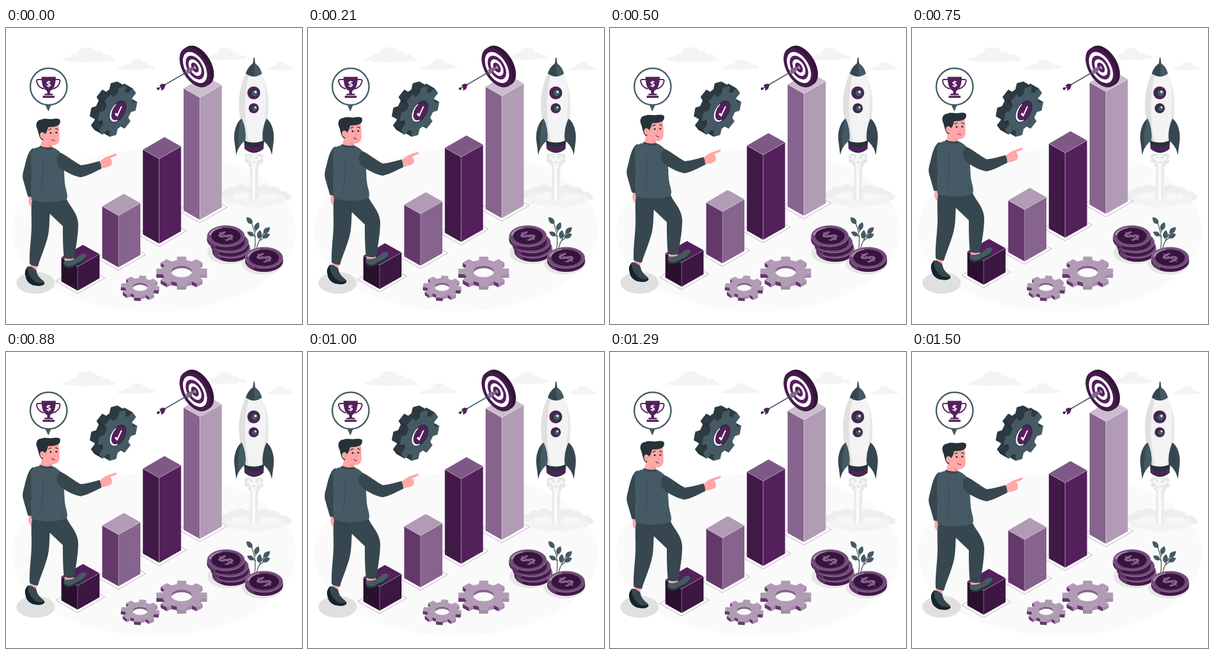
Write an HTML page that moves like this. It is 500 by 500 pixels and loops after 1.54 s.

```html
<!DOCTYPE html>
<html lang="en">
<head>
<meta charset="utf-8">
<title>Growth steps</title>
<style>
html, body { margin: 0; width: 100%; height: 100%; overflow: hidden; background: #fff; }
svg { display: block; width: 100vw; height: 100vh; }
text { font-family: "Open Sans", Arial, sans-serif; font-weight: 700; text-anchor: middle; }
</style>
</head>
<body>
<svg viewBox="0 0 500 500">
  <ellipse cx="250" cy="342" rx="239.500" ry="137.500" fill="#fafafa"/>

  <g fill="#f4f4f4">
    <path d="M95 55C97 50 103 49 108 49C110 44 115 42 120 44C121 35 128 32 135 33C143 31 150 35 153 41C158 38 164 41 165 46C171 43 176 46 177 49C181 50 184 52 185 55C179 58 173 54 166 56C157 59 151 56 143 56C134 60 128 56 119 57C111 58 103 55 95 55Z"/>
    <path d="M188 69C190 66 195 65 199 65C201 61 205 60 209 62C211 55 216 52 222 53C228 52 231 56 232 59C236 57 240 59 241 63C246 62 251 64 252 68C246 70 242 68 237 69C231 71 226 69 220 70C212 72 206 69 200 70C196 71 192 70 188 69Z"/>
    <path d="M335 52C337 48 342 47 346 47C348 43 353 42 356 44C358 36 364 33 370 34C378 33 382 37 383 42C388 39 393 42 394 46C400 45 405 47 407 51C400 54 395 51 389 53C382 55 377 52 370 53C362 55 352 52 347 54Z"/>
    <path d="M440 70C442 67 446 66 449 66C451 63 453 63 455 64C456 59 460 57 465 58C470 57 472 60 473 63C476 62 479 63 480 66C483 66 486 68 487 70C481 72 477 70 472 71C466 73 461 70 455 71C449 73 445 70 440 70Z"/>
  </g>

  <ellipse cx="50" cy="430.500" rx="32.500" ry="18.500" fill="#e0e0e0"/>
  <g id="smoke"></g>

  <!-- rocket -->
  <g>
    <path d="M412 212H427L425 288Q419 293 412 288Z" fill="#ebebeb"/>
    <path d="M416 214H421V290H416Z" fill="#fafafa"/>
    <g id="puffs"></g>
    <path d="M402 188H436L435 204Q419 218 403 204Z" fill="#263238"/>
    <path d="M403 195Q419 208 435 195V202Q419 215 403 202Z" fill="#54205c"/>
    <path d="M405 77C396 95 392 118 394 140C396 160 399 177 402 189Q419 198 436 189C440 172 444 150 444 128C444 109 440 92 432 77Z" fill="#f3f3f3"/>
    <path d="M405 77C396 95 392 118 394 140C396 160 399 177 402 189Q406 192 411 193C403 165 400 115 410 80Z" fill="#e0e0e0"/>
    <path d="M437 92C446 118 443 158 436 189L430 192C438 160 442 120 437 92Z" fill="#e6e6e6"/>
    <path id="fin" d="M398 153C388 160 384 178 386 192L389 215C391 204 396 196 404 190C406 178 403 163 398 153Z" fill="#37474f"/>
    <path d="M398 153C393 166 391 186 393 203C396 197 400 193 404 190C406 178 403 163 398 153Z" fill="#455a64"/>
    <use href="#fin" transform="matrix(-1 0 0 1 838 0)"/>
    <path d="M418.300 50H419.700L421 60C427 64 431 71 432 77Q419 87 405 77C407 70 411 64 417 60Z" fill="#37474f"/>
    <path d="M419 59C426 63 431 71 432 77Q427 81 420 81Z" fill="#455a64"/>
    <g id="ports"></g>
  </g>

  <g id="lift">
    <g id="bars"></g>
    <!-- person -->
    <g>
      <path d="M39 283L38 291C38 297 41 300 44 303L48 286Z" fill="#ffa8a7"/>
      <path d="M41 398H54L50 410L41 406Z" fill="#ffa8a7"/>
      <path d="M99 385H115L114 394C109 397 103 396 99 393Z" fill="#ffa8a7"/>
      <path d="M37 402C33 407 31 411 33 418C34 427 41 433 48 434C57 436 66 434 65 429C63 425 56 422 53 415C51 410 52 407 48 406Q42 401 37 402Z" fill="#37474f"/>
      <path d="M37 402C33 407 31 411 33 418C34 427 41 433 48 434C57 436 66 434 65 429C57 432 50 430 45 424C39 417 36 411 37 402Z" fill="#17232a"/>
      <path d="M98 392C96 400 99 405 105 405C114 404 120 399 128 397C135 393 137 386 135 381C130 379 126 381 122 385C115 392 106 393 98 392Z" fill="#455a64"/>
      <path d="M98 398C97 403 101 406 105 405C114 404 120 399 128 397C133 394 136 389 136 384C131 394 120 395 114 400C108 403 102 403 98 398Z" fill="#263238"/>
      <path d="M45 286L102 287C107 300 121 311 122 330C122 350 118 370 115 388Q106 391 98 387C96 370 96 350 96 334L74 313C73 330 74 345 67 364C62 380 57 390 54 402Q46 402 40 398C39 380 42 360 43 340C44 318 41 303 45 286Z" fill="#37474f"/>
      <path d="M74 313C71 306 64 300 59 295" fill="none" stroke="#263238" stroke-width=".8"/>
      <path d="M47 202C39 204 35 218 32 231C29 243 27 248 29 256L37 284L44 285L43 262L48 225Z" fill="#37474f"/>
      <path d="M57 200C51 201 44 203 42 210C42 235 44 262 43 289C58 295 82 296 102 289C105 285 103 279 102 274C98 260 99 250 98 240L93 211C88 205 82 202 77 200Z" fill="#455a64"/>
      <path d="M62 221C64 240 61 261 60 280M98 282C96 279 95 276 94 273" fill="none" stroke="#37474f" stroke-width=".8"/>
      <path d="M62 184L58 199C63 203 72 204 78 202L77 191Z" fill="#ffa8a7"/>
      <path d="M57 198Q67 203 78 200L78 204Q67 206 56 201Z" fill="#37474f"/>
      <path d="M70 195Q74 197 77 196L77 201Q73 200 70 195Z" fill="#f28f8f"/>
      <path d="M60 168L89 163C90 170 91 183 90 190C88 196 82 198 76 197C69 196 64 191 61 186Z" fill="#ffa8a7"/>
      <path d="M53 170C49 162 52 154 60 154C65 151 72 154 78 153C84 152 88 152 91 154C93 159 90 164 85 165C80 167 75 166 71 167C70 171 69 175 67 177L62 189C56 187 55 176 53 170Z" fill="#263238"/>
      <ellipse cx="62" cy="181" rx="4.500" ry="5.800" fill="#ffa8a7" transform="rotate(-15 62 181)"/>
      <path d="M60 179Q63 180 63.500 184" fill="none" stroke="#f28f8f"/>
      <circle cx="75.500" cy="176.500" r="1.600" fill="#263238"/>
      <circle cx="85" cy="176" r="1.600" fill="#263238"/>
      <path d="M72 172Q74 169 77 170M83 169.500Q86 169 88 171.500" fill="none" stroke="#263238" stroke-width="1.300"/>
      <path d="M80 176L82 183L79 183.500" fill="none" stroke="#f28f8f"/>
      <path d="M77 187Q79 190 83 189.500" fill="none" stroke="#54205c" stroke-width="1.100"/>
      <path d="M157 226C163 221 166 218 172 216L185 211.500C188 211 188 214 185 215.500L176 219C179 222 180 227 178 231C173 235 166 235 160 237Z" fill="#ffa8a7"/>
      <path d="M92 210C103 215 115 225 126 231C137 230 147 227 158 224Q161 230 161 237C150 242 138 249 126 251.500C113 249 98 241 89 233C84 225 85 214 92 210Z" fill="#37474f"/>
    </g>
  </g>

  <!-- bubble -->
  <path d="M65 127L71.500 141L77.500 127Z" fill="#455a64"/>
  <circle cx="72" cy="99" r="31" fill="#fff" stroke="#455a64" stroke-width="2.500"/>
  <g fill="#54205c">
    <path d="M61 87H54Q51 87 52 91Q54 100 64 103M83 87H89Q92 87 91 91Q89 100 79 103" fill="none" stroke="#54205c" stroke-width="2"/>
    <path d="M60 82.500H84C84 96 81 103 74.500 106.500V111H79V113.500H65V111H69.500V106.500C63 103 60 96 60 82.500ZM62 114.500H82V118H62Z"/>
    <text x="72" y="99.500" font-size="15" fill="#fff">$</text>
  </g>

  <!-- target -->
  <g id="target"></g>
  <path d="M257 102.500L318 67" stroke="#455a64" stroke-width="1.800"/>
  <path d="M303 71L313 66L318 67L314 74L305 79L307 74Z" fill="#87648d"/>
  <path d="M259 97L264 94L270 95L267 103L262 106L262 100Z" fill="#54205c"/>
  <circle cx="257" cy="102.500" r="2.300" fill="#263238"/>

  <g id="gears"></g>

  <!-- plant and coins -->
  <g id="plant">
    <path d="M420 373C423 354 419 336 411 322M423 373C427 358 433 348 442 339M421 345L426 331M422 353L411 346M429 359L438 352" fill="none" stroke="#37474f" stroke-width="1.200"/>
  </g>
  <g id="coins"></g>
</svg>
<script>
const $ = id => document.getElementById(id);
const add = (id, s) => $(id).insertAdjacentHTML('beforeend', s);
const oval = (x, y, rx, ry, fill, extra = '') =>
  `<ellipse cx="${x}" cy="${y}" rx="${rx}" ry="${ry}" fill="${fill}" ${extra}/>`;
const poly = (pts, fill, extra = '') =>
  `<polygon points="${pts.map(p => p.map(v => v.toFixed(2)).join()).join(' ')}" fill="${fill}" ${extra}/>`;

// x, y: front bottom corner; h: front edge height
function bar(x, y, h, left, right, top) {
  const t = y - h, edge = 'stroke="#fff" stroke-opacity=".45" stroke-width=".8"';
  return poly([[x - 37, y - 16], [x, y + 5], [x + 46, y - 21.5], [x + 9, y - 43]],
      '#fff', 'stroke="#a99bab" stroke-width=".8"') +
    poly([[x - 27.5, t - 15.5], [x, t], [x, y], [x - 27.5, y - 15.5]], left) +
    poly([[x, t], [x + 37, t - 21], [x + 37, y - 21], [x, y]], right) +
    poly([[x - 27.5, t - 15.5], [x + 9, t - 36.7], [x + 37, t - 21], [x, t]], top) +
    `<path d="M${x - 27.5} ${t - 15.5}L${x} ${t}L${x + 37} ${t - 21}M${x} ${t}V${y}" fill="none" ${edge}/>`;
}
add('bars',
  bar(327.5, 323.3, 206.5, '#87648d', '#b19bb5', '#cbbcce') +
  bar(258.7, 363.6, 143.4, '#411947', '#54205c', '#7f5985') +
  bar(190, 403.5, 87.4, '#65386c', '#87648d', '#b19bb5') +
  bar(121, 443, 40.7, '#2a102e', '#3b1741', '#54205c'));

// m: plane axes; off: extrusion vector
function gear(x, y, R, r, phase, m, off, face, sides, line) {
  const at = (a, q) => [x + q * (m[0] * Math.cos(a) + m[2] * Math.sin(a)),
                        y + q * (m[1] * Math.cos(a) + m[3] * Math.sin(a))];
  const move = p => [p[0] + off[0], p[1] + off[1]];
  const pts = [];
  for (let k = 0; k < 8; k++) {
    const a = phase + k * Math.PI / 4;
    for (const [d, q] of [[-.24, r], [-.17, R], [.17, R], [.24, r]]) pts.push(at(a + d, q));
  }
  const depth = q => (q[0][0] + q[1][0]) * off[0] + (q[0][1] + q[1][1]) * off[1];
  const walls = pts.map((p, i) => {
    const n = pts[(i + 1) % pts.length];
    return [p, n, move(n), move(p)];
  }).sort((a, b) => depth(a) - depth(b));
  return poly(pts.map(move), sides[0]) +
    walls.map(w => poly(w, sides[(w[1][1] - w[0][1]) * (w[1][0] - w[0][0]) > 0 ? 0 : 1])).join('') +
    poly(pts, face, `stroke="${line}" stroke-width=".6"`);
}

const flat = [1, 0, 0, .577], wall = [.87, -.5, 0, 1];
function cog(id, x, y, R, phase, hole, thick) {
  const ry = hole * .56;
  return gear(x, y, R, R * .77, phase, flat, [0, thick], '#b19bb5', ['#65386c', '#a88dae'], '#cbbcce') +
    `<clipPath id="${id}">${oval(x, y, hole, ry, '#000')}</clipPath><g clip-path="url(#${id})">` +
    oval(x, y, hole, ry, '#87648d') + oval(x, y + thick * .75, hole, ry, '#fafafa') + '</g>' +
    oval(x, y, hole, ry, 'none', 'stroke="#cbbcce" stroke-width=".7"');
}
add('gears',
  gear(188.5, 141, 38, 29, .25, wall, [-14, -8], '#455a64', ['#263238', '#2c3a41'], '#546870') +
  `<g transform="matrix(.87 -.5 0 1 189 141)">
    <circle r="16.500" fill="#263238"/>
    <path d="M-4 -15A15.500 15.500 0 0 0 -1 15.500L0 12Z" fill="#fff"/>
    <circle cx="1" r="13.800" fill="#54205c"/>
    <path d="M-5 1L-1 6L7 -5" fill="none" stroke="#fff" stroke-width="3"/>
  </g>` +
  cog('h1', 296.7, 411, 43.2, 0, 18, 6.5) +
  cog('h2', 226.5, 437, 32.5, .15, 13, 5.5));

// isometric disc: thick rim, then alternating rings
const plate = (x, y, r, fill) =>
  `<circle r="${r}" fill="${fill}" transform="matrix(.87 .5 0 1 ${x} ${y})"/>`;
let disc = '';
for (let k = 6; k > 0; k--) disc += plate(319.2 + k, 66.8 - k * .6, 30, '#37143d');
['#451a4c', '#fff', '#54205c', '#fff', '#54205c', '#b19bb5'].forEach((c, i) =>
  disc += plate(319.2, 66.8, [30, 23.5, 18, 12.6, 7.5, 2.6][i], c));
add('target', disc);

const ring = (x, y, r) =>
  `<circle cx="${x}" cy="${y}" r="${r}" fill="#54205c"/>` +
  `<circle cx="${x + .8}" cy="${y}" r="${r * .68}" fill="#263238"/>` +
  `<circle cx="${x + 1.5}" cy="${y + .5}" r="${r * .5}" fill="#455a64"/>` +
  `<circle cx="${x + 3}" cy="${y - 1.5}" r="${r * .2}" fill="#e8e0ea"/>`;
add('ports', ring(418.5, 109.5, 10.8) + ring(418.5, 135.5, 8.6));

const blobs = (list, fill) => list.map(([x, y, r]) => oval(x, y, r, r * .82, fill)).join('');
add('smoke',
  blobs([[372, 281, 9], [383, 275, 9], [398, 273, 11], [412, 279, 14], [436, 274, 12], [452, 279, 13], [468, 284, 10], [476, 286, 6]], '#eeeeee') +
  oval(422, 289, 51, 12, '#f0f0f0') +
  blobs([[378, 291, 9], [392, 290, 12], [410, 293, 13], [430, 294, 12], [447, 289, 13], [463, 289, 10]], '#f3f3f3') +
  blobs([[390, 284, 7], [403, 283, 8], [437, 285, 8], [452, 284, 7]], '#f7f7f7'));
add('puffs', blobs([[409, 217, 6], [429, 217, 6], [408, 224, 5], [430, 225, 5], [413, 231, 4], [425, 231, 4]], '#e6e6e6') +
  blobs([[419, 221, 8], [411, 219, 4], [427, 220, 4], [419, 231, 5]], '#f7f7f7') +
  blobs([[414, 218, 2], [423, 219, 2.5], [419, 227, 2]], '#e0e0e0'));

const leaf = (x, y, rot, s) =>
  `<path transform="translate(${x} ${y}) rotate(${rot}) scale(${s})" d="M0 0C-6 -4 -5 -10 0 -15C5 -10 6 -4 0 0Z" fill="#455a64"/>`;
add('plant', [[416, 331, -40, 1], [421, 342, 22, 1], [419, 351, -60, .9],
  [435, 347, 46, 1], [433, 354, 66, .95], [427, 356, 8, 1]].map(l => leaf(...l)).join(''));

function coin(x, y) {
  return `<path d="M${x - 32} ${y}V${y + 6}A32 18 0 0 0 ${x + 32} ${y + 6}V${y}Z" fill="#411947"/>` +
    `<path d="M${x - 30} ${y + 7}A32 18 0 0 0 ${x - 17} ${y + 16}V${y + 20}A32 18 0 0 1 ${x - 30} ${y + 12}Z" fill="#65386c"/>` +
    oval(x, y, 31.5, 17.8, '#714a78', 'stroke="#9c7fa2" stroke-width="1"') +
    `<path d="M${x - 29} ${y - 2}A29 16 0 0 1 ${x - 8} ${y - 15}L${x - 6} ${y - 12}A24 13 0 0 0 ${x - 23} ${y - 1}Z" fill="#a88dae"/>` +
    oval(x, y, 25, 13.8, '#37143d') +
    `<text transform="matrix(.87 -.5 .87 .5 ${x} ${y})" y="11.500" font-size="32" fill="#87648d">$</text>`;
}
add('coins', oval(376, 379, 36, 20, '#e6e6e6') + oval(433, 397, 35, 19.5, '#e6e6e6') +
  coin(380.5, 371) + coin(378, 362) + coin(371.5, 351.5) + coin(436, 388));

// the figure and bars drift up 10 units and back, at 24 steps a second
const LOOP = 1540, REST = .7, start = performance.now();
function draw(t) {
  const step = Math.floor((t % LOOP + 4.9) * .024);
  const rise = 10 * (1 - Math.abs(1 - (step % 36) / 18));
  $('lift').setAttribute('transform', `translate(0 ${(REST - rise).toFixed(3)})`);
}
function tick(now) {
  draw(Math.max(0, now - start));
  requestAnimationFrame(tick);
}
draw(0);
requestAnimationFrame(tick);
</script>
</body>
</html>
```
